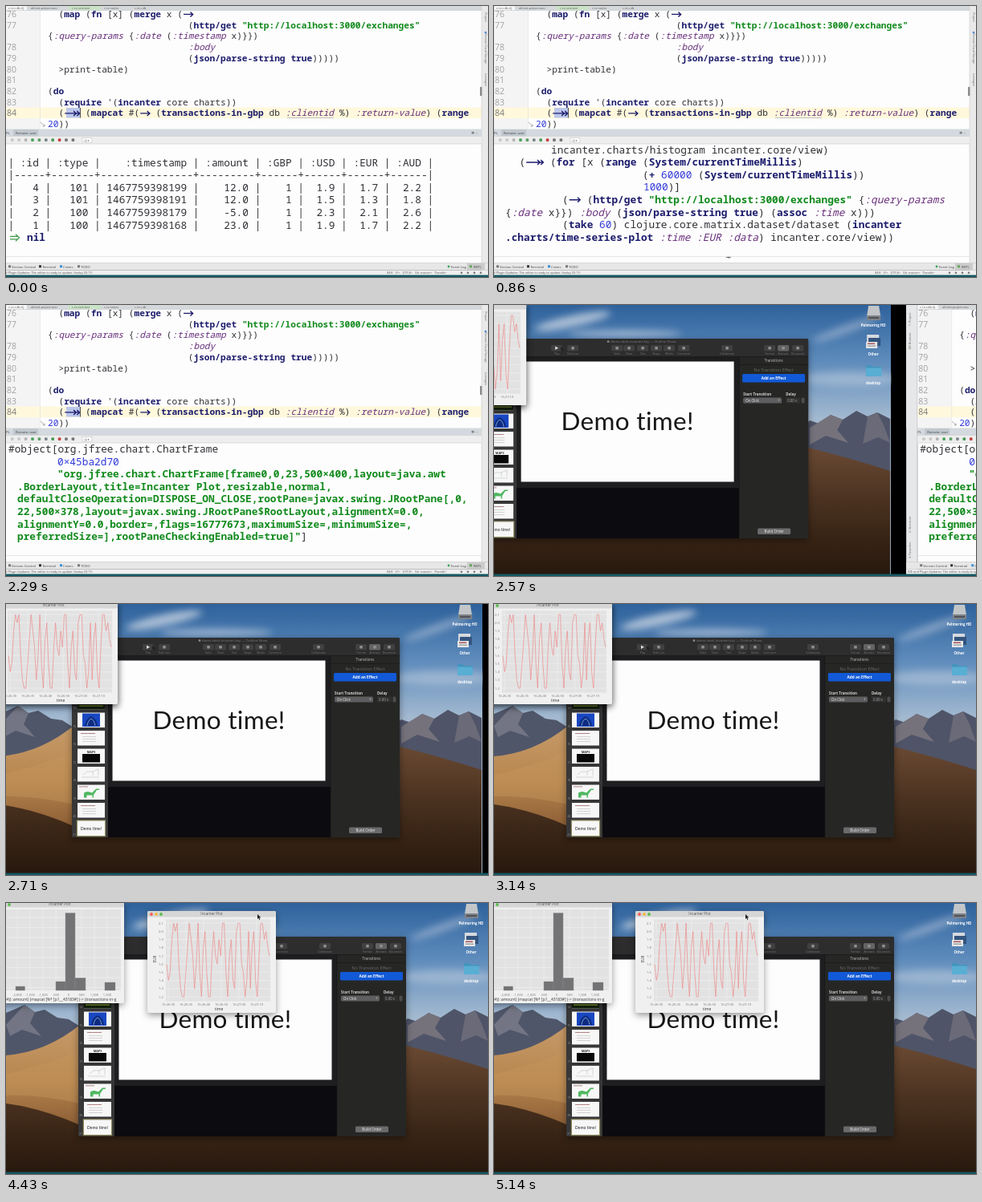
An HTML page that plays this animation: 600 px wide and 338 px high, repeating every 5.28 s.

```html
<!DOCTYPE html>
<html lang="en">
<head>
<meta charset="utf-8">
<title>Live coding demo</title>
<style>
  html, body { margin: 0; width: 100%; height: 100%; overflow: hidden; background: #000; }
  svg { display: block; width: 600px; height: 338px; }
  text { white-space: pre; font-family: "Open Sans", "Noto Sans", sans-serif; }
  .mono { font-family: "Noto Sans Mono", "DejaVu Sans Mono", monospace; fill: #303036; }
  .fn { font-weight: 700; fill: #1c1c6c; }
  .str { font-weight: 700; fill: #118a1c; }
  .key { font-style: italic; fill: #69307c; }
  .num { fill: #3038d8; }
  .mid { text-anchor: middle; }
  .bold { font-weight: 700; }
  .slide { font-family: Lato, "Open Sans", sans-serif; font-variant-ligatures: none; letter-spacing: .01em; }
  .win { filter: drop-shadow(0 3px 4px rgba(0, 0, 0, .4)); }
</style>
</head>
<body>
<svg id="stage" viewBox="0 0 600 338"></svg>
<script>
const LOOP = 5280, STEP = LOOP / 37;
const SPACE = 634;                       // distance between the two desktops

const esc = s => s.replace(/&/g, '&amp;').replace(/</g, '&lt;').replace(/>/g, '&gt;');
const rect = (x, y, w, h, fill, more = '') =>
  `<rect x="${x}" y="${y}" width="${w}" height="${h}" fill="${fill}" ${more}/>`;
const dot = (x, y, r, fill) => `<circle cx="${x}" cy="${y}" r="${r}" fill="${fill}"/>`;
const path = (d, fill, more = '') => `<path d="${d}" fill="${fill}" ${more}/>`;
const line = (d, color, width = 1) => path(d, 'none', `stroke="${color}" stroke-width="${width}"`);
const label = (x, y, s, size, fill, cls = '') =>
  `<text x="${x}" y="${y}" font-size="${size}" fill="${fill}" class="${cls}">${esc(s)}</text>`;
const mid = (x, y, s, size, fill, cls = '') => label(x, y, s, size, fill, 'mid ' + cls);
const turned = (x, y, s, size, fill, deg = -90) =>
  `<g transform="translate(${x} ${y}) rotate(${deg})">${mid(0, 0, s, size, fill)}</g>`;
const mono = (x, y, s, size, cls = '') =>
  `<text x="${x}" y="${y}" font-size="${size}" class="mono ${cls}">${esc(s)}</text>`;
const gradient = (id, ...stops) =>
  `<linearGradient id="${id}" x1="0" y1="0" x2="0" y2="1">` +
  stops.map(([at, c]) => `<stop offset="${at}" stop-color="${c}"/>`).join('') + '</linearGradient>';

// ---- code ----
const TOKEN = /"[^"]*"|->>?|:[a-zA-Z-]+|\.?\w[\w.\/-]*|\S/g;

function arrow(x, y, w, heads) {
  const end = x + w - 1;
  let d = `M${x + 1} ${y}H${end}`;
  for (let i = 0; i < heads; i++) d += `M${end - 3 - i * 4.2} ${y - 3}l3.2 3l-3.2 3`;
  return line(d, '#1c1c6c', 1.4);
}

function code(x, y, s, size) {
  const cw = size * .6;
  let out = '';
  for (const m of s.matchAll(TOKEN)) {
    const w = m[0], tx = x + m.index * cw;
    if (/^->/.test(w)) { out += arrow(tx, y - size * .32, w.length * cw, w.length - 1); continue; }
    const cls = w[0] === '"' ? 'str'
      : /^:[a-z]/i.test(w) ? 'key'
      : /^\d+$/.test(w) ? 'num'
      : s[m.index - 1] === '(' && w !== '(' || /^(fn|true|\.charts.*)$/.test(w) ? 'fn' : '';
    out += mono(+tx.toFixed(2), y, w, size, cls);
  }
  return out;
}

// ---- code editor ----
const ED = 11.2, RP = 12.8;
const edY = row => 14 + row * 13.72;
const rpY = row => 184 + row * 15.6;

function editor() {
  const pad = ' '.repeat(26);
  const rows = [
    [76, '  (map (fn [x] (merge x (->'],
    [77, pad + '(http/get "http://localhost:3000/exchanges"'],
    ['', '{:query-params {:date (:timestamp x)}})'],
    [78, pad + ':body'],
    [79, pad + '(json/parse-string true)))))'],
    [80, '  >print-table)'],
    [81, ''],
    [82, '(do'],
    [83, "  (require '(incanter core charts))"],
    [84, '  (->> (mapcat #(-> (transactions-in-gbp db :clientid %) :return-value) (range'],
    ['', '20))']
  ];
  let s = rect(-14, 0, 614, 154, '#fdfdfd') + rect(0, 5, 42, 149, '#f4f4f4') +
    rect(0, 126.5, 592, 13.7, '#fff8dc') + rect(75, 127, 17, 12.5, '#bcc7ea') +
    line('M42.5 5V154', '#e2e2e2', .7);
  rows.forEach(([n, text], i) => {
    s += label(1, edY(i), String(n), 10.5, i === 9 ? '#777' : '#a2a2a2') + code(52, edY(i), text, ED);
  });
  return s + line('M350 139.5H408', '#999', .6) + line('M92.5 127V139.5', '#222', .8) +
    line('M43 145l5 5m0-2.5v2.5h-2.5', '#999', .8);
}

function ideFrame() {
  let s = rect(-14, 0, 614, 6, '#d5d8da') + rect(0, 0, 26, 5, '#f5f5f5') + rect(78, 0, 40, 5, '#c9e3c6');
  ['c.i.e.c.db.clj', 'atl-test-project.exec', 'c.i.e.core.test', 'c.i.e.routes', 'c.i.e.c.db'].forEach((t, i) => {
    s += label([3, 31, 82, 122, 160][i], 4, t, 3.6, '#555');
  });
  // side bars
  s += rect(592, 0, 8, 336, '#e9e9e9') + line('M592 0V320', '#cfcfcf', .6) + rect(590, 101, 2.5, 11, '#8d8d8d') +
    turned(595.5, 14, 'Project', 3.6, '#666', 90) + turned(595.5, 53, 'Remote Cloud Storage', 3.6, '#666', 90) +
    turned(595.5, 92, 'Leiningen', 3.6, '#666', 90) + dot(597, 33, 1.3, '#4a86cf') +
    rect(-14, 0, 14, 336, '#e6e7e8') + line('M-.5 0V320', '#c9c9c9', .8) +
    turned(-8, 18, '1: Project', 3.8, '#666') + turned(-8, 45, 'DB Browser', 3.8, '#666') +
    turned(-8, 274, '2: Structure', 3.8, '#666') + turned(-8, 306, '2: Favorites', 3.8, '#666');
  // console header and tools
  s += rect(0, 153.5, 592, 9, '#d3d9de') + rect(9, 154, 31, 8, '#c0c8ce') +
    label(0, 159.5, 'PL', 4.2, '#444') + label(12, 159.5, 'Remote: user', 4.2, '#444') +
    label(579, 160, '✱ –', 5, '#777') + rect(0, 162.5, 592, 9.5, '#eeeeee') +
    line('M0 162.5H592M0 172H592', '#cccccc', .6);
  const tints = ['#c9c9c9', '#c9c9c9', '#b5b5b5', '#4ea45b', '#5e9f68', '#7d8791', '#4a9b56', '#c74343', '#777', '#777'];
  tints.forEach((c, i) => { s += rect(6 + i * 8.4, 165.3, 3.6, 3.6, c, 'rx="1"'); });
  s += rect(95, 164.5, 12, 5.5, '#fff', 'stroke="#bbb" stroke-width=".5"') + label(97, 168.8, 'clj ▾', 3.6, '#555');
  // bottom bars
  s += line('M0 312.5H592', '#dedede', .7) + rect(-14, 320.5, 614, 9, '#e7e7e7') +
    rect(-14, 329.5, 614, 7, '#efefef') + line('M-14 320.5H600M-14 329.5H600', '#c7c7c7', .6);
  [[7, 'Version Control', '#777'], [45, 'Terminal', '#333'], [71, 'Crates', '#3c8fd1'], [93, 'TODO', '#777']].forEach(([x, t, c]) => {
    s += rect(x - 4, 323.3, 3, 3, c) + label(x, 326.8, t, 4.2, '#444');
  });
  s += rect(574, 321, 22, 8, '#cbcbcb') + dot(551, 325, 1.4, '#3aa757') + label(554, 326.8, 'Event Log', 4.2, '#444') +
    label(582, 326.8, 'REPL', 4.2, '#444') + rect(577, 323.3, 3, 3, '#65a35e') +
    label(-12, 334, 'IDE and Plugin Updates: The editor is ready to update. (today 20:11)', 3.8, '#555') +
    label(474, 334, '84:8   LF÷   UTF-8÷   Git: master÷   Paredit÷', 3.8, '#555');
  [567, 575, 583, 591].forEach(x => { s += dot(x, 332.7, 1.3, '#777'); });
  return s;
}

function tableView() {
  const heads = [':id', ':type', ':timestamp', ':amount', ':GBP', ':USD', ':EUR', ':AUD'];
  const widths = [3, 5, 13, 7, 4, 4, 4, 4];
  const data = [
    ['4', '101', '1467759398199', '12.0', '1', '1.9', '1.7', '2.2'],
    ['3', '101', '1467759398191', '12.0', '1', '1.5', '1.3', '1.8'],
    ['2', '100', '1467759398179', '-5.0', '1', '2.3', '2.1', '2.6'],
    ['1', '100', '1467759398168', '23.0', '1', '1.9', '1.7', '2.2']
  ];
  const row = r => '| ' + r.map((c, i) => c.padStart(widths[i])).join(' | ') + ' |';
  const rule = '|' + widths.map(w => '-'.repeat(w + 2)).join('+') + '|';
  return [row(heads), rule, ...data.map(row)].map((t, i) => mono(2.5, rpY(i + 1), t, RP)).join('') +
    line('M5 287.4h10M5 290.8h10M12 284.8l4.5 4.3l-4.5 4.3', '#3f9a48', 1.2) +
    mono(26, rpY(7), 'nil', RP, 'fn');
}

function formView() {
  return [
    [71, 'incanter.charts/histogram incanter.core/view)'],
    [31.5, '(->> (for [x (range (System/currentTimeMillis)'],
    [185, '(+ 60000 (System/currentTimeMillis))'],
    [186, '1000)]'],
    [85, '(-> (http/get "http://localhost:3000/exchanges" {:query-params'],
    [14, '{:date x}}) :body (json/parse-string true) (assoc :time x)))'],
    [85, '(take 60) clojure.core.matrix.dataset/dataset (incanter'],
    [14, '.charts/time-series-plot :time :EUR :data) incanter.core/view))']
  ].map(([x, t], i) => code(x, rpY(i) - .5, t, RP)).join('') + line('M289 313.5h6M292 312v3', '#555', .8);
}

function objectView() {
  const body = [
    '"org.jfree.chart.ChartFrame[frame0,0,23,500×400,layout=java.awt',
    '.BorderLayout,title=Incanter Plot,resizable,normal,',
    'defaultCloseOperation=DISPOSE_ON_CLOSE,rootPane=javax.swing.JRootPane[,0,',
    '22,500×378,layout=javax.swing.JRootPane$RootLayout,alignmentX=0.0,',
    'alignmentY=0.0,border=,flags=16777673,maximumSize=,minimumSize=,',
    'preferredSize=],rootPaneCheckingEnabled=true]"'
  ];
  return mono(3, rpY(0), '#object[org.jfree.chart.ChartFrame', RP) + mono(64, rpY(1), '0×45ba2d70', RP, 'num') +
    body.map((t, i) => mono(i ? 14 : 64, rpY(i + 2), t, RP, 'str')).join('') +
    mono(14 + body[5].length * RP * .6, rpY(7), ']', RP);
}

// ---- desktop ----
function wallpaper() {
  return rect(-1, 0, 602, 338, 'url(#sky)') +
    `<g filter="url(#soft)" fill="#d3dbe6">
      <ellipse cx="205" cy="20" rx="48" ry="7" opacity=".75" transform="rotate(-12 205 20)"/>
      <ellipse cx="270" cy="36" rx="70" ry="5" opacity=".6"/>
      <ellipse cx="545" cy="30" rx="45" ry="5" opacity=".45" transform="rotate(-20 545 30)"/>
      <ellipse cx="550" cy="92" rx="60" ry="9" opacity=".4"/></g>` +
    path('M0 137L12 132L23 127L36 136L48 133L64 143L78 145L92 154V215H0Z', '#50566a') +
    path('M23 127L36 136L30 150L44 166L20 158L5 166L0 152Z', '#737584') +
    path('M490 152L500 144L512 148L526 137L541 143L558 132L572 139L584 134L600 142V215H490Z', '#4f5468') +
    path('M526 137L541 143L534 156L548 172L520 163L500 174V153Z', '#75727c') +
    path('M572 139L584 134L592 150L600 172L585 165L566 173Z', '#6a6a78') +
    path('M0 190Q50 186 92 152V290H0Z', 'url(#sand)') +
    path('M0 213Q38 206 92 184V250Q40 238 0 240Z', '#c4945c', 'opacity=".45"') +
    path('M0 250Q45 256 92 277L490 176Q548 190 600 207V338H0Z', 'url(#shade)');
}

function icons() {
  let s = path('M573 1h13l2 13h-17z', '#c3c6c9') + rect(571, 13, 17, 6, '#7d8288', 'rx="1"') +
    rect(573, 15, 13, 2, '#50545a');
  s += rect(571, 37, 15, 9, '#d5d9de') + rect(573, 41, 15, 10, '#34557f') + rect(570, 46, 14, 8, '#e6e6e6') +
    rect(572, 47.5, 9, 1.5, '#a8585c') + rect(572, 50.5, 10, 1.2, '#8f979f');
  s += path('M570 75h7l2 2h10v11.5h-19z', '#4594be') + rect(570, 78.5, 19, 10.5, '#58aed3', 'rx="1"');
  [['Pelmoring HD', 26.5], ['Other', 62.5], ['desktop', 98.5]].forEach(([t, y]) => { s += mid(579, y, t, 4.5, '#fff', 'bold'); });
  return s;
}

function thumbs() {
  const ys = [113, 135.5, 158, 180.5, 203, 225.5, 248, 270.5];
  const lines = y => rect(101, y, 18, .8, '#a0666a') + [4, 7, 10].map(d => rect(103, y + d, 17, .6, '#bbb')).join('');
  const art = [
    rect(97, 113, 34, 18.5, '#14220f') + rect(99, 126, 30, 2, '#6a7d2e'),
    rect(103, 136.5, 22, 16.5, '#1947c2') + path('M106 152q1-9 8-12q7 3 8 12z', '#0d2c80') + line('M109 152q1-7 5-9q4 2 5 9', '#8fb6ee', .8),
    lines(161),
    mid(114, 185.5, 'MAPS', 3.8, '#333', 'bold') + rect(103, 187, 22, 10.5, '#080808'),
    line('M102 216h22M104 213l5-4h7v5M116 209l7-3v8', '#a9b4ae', .5),
    rect(99, 227.5, 11, .8, '#a0666a') + path('M105 241.5v-6q4-3 10 0l5-5h4v1.5h-3l-4 6v3.5h-1.5v-3h-7v3z', '#4fb860'),
    lines(251),
    mid(114, 281.5, 'Demo time!', 5, '#222', 'slide')
  ];
  return rect(95.8, 269.3, 36.4, 20.9, '#8d8a5e', 'rx="1"') + ys.map((y, i) =>
    rect(97, y, 34, 18.5, '#f7f7f7') + art[i] + label(91.5, y + 18, String(14 + i), 3, '#aaa')).join('');
}

function deck() {
  let s = rect(90, 42, 408, 249, '#1e1e20', 'rx="2"') + rect(90, 42, 408, 22.5, '#2d2d2e', 'rx="2"') +
    rect(90, 64, 45, 227, '#373738') + rect(135, 228, 277, 63, '#0c0b10') +
    rect(412, 64.5, 86, 226.5, '#262725') + line('M90 64.5H498M412 64V291M412 74.5H498', '#171717', .7);
  s += dot(249, 45.7, 1.4, '#8a8a8a') + label(252, 47.3, 'demo-deck-incanter.key — Outline Show', 4.3, '#7d7d7d');
  const tools = [[185, 'Play'], [205, 'Slide Live'], [260, 'Table'], [275, 'Chart'], [292, 'Text'], [309, 'Shape'],
    [325, 'Media'], [343, 'Comment'], [397, 'Collaborate'], [450, 'Format'], [467, 'Animate'], [485, 'Document']];
  tools.forEach(([x, t]) => {
    s += rect(x - 7, 50, 14, 7.5, t === 'Animate' ? '#636363' : '#404041', 'rx="1.5"') +
      (t === 'Play' ? path('M183 51.5l4 2.3l-4 2.3z', '#ddd') : rect(x - 1.8, 52, 3.6, 3.5, '#8f8f8f', 'rx=".7"')) +
      mid(x, 62.2, t, 3.4, '#777');
  });
  s += rect(140.5, 70.5, 265, 150, '#fcfdfc') + mid(273, 155.5, 'Demo time!', 31.5, '#161616', 'slide');
  s += mid(455, 71, 'Transitions', 4.5, '#c8c8c8') + mid(455, 83, 'No Transition Effect', 5.4, '#6c6c6c') +
    rect(416, 86, 78, 10.5, '#1159d6', 'rx="1.5"') + mid(455, 93, 'Add an Effect', 4.7, '#fff', 'bold') +
    label(417, 112.5, 'Start Transition', 4.5, '#d5d5d5', 'bold') + label(470, 112.5, 'Delay', 4.5, '#d5d5d5', 'bold') +
    rect(417, 115.5, 48, 7, '#5e5e60', 'rx="1.5"') + label(420, 120.7, 'On Click', 4.4, '#eee') +
    label(460, 120.7, '÷', 5, '#eee') + rect(470, 115.5, 18, 7, '#303030') + label(472, 120.7, '0.00 s', 4.4, '#aaa') +
    rect(489.5, 115.5, 4, 7, '#4c4c4c', 'rx="1.5"') +
    rect(435, 278.5, 41, 7.5, '#6a6a6c', 'rx="1.5"') + mid(455.5, 284, 'Build Order', 4.5, '#f0f0f0');
  return s + thumbs();
}

// ---- chart windows, 160 x 127, own coordinates ----
const frame = rect(0, 0, 160, 127, '#f0f0f0', 'rx="2"') + rect(0, 0, 160, 7.5, '#d6d6d6', 'rx="2"') +
  ['#f0605a', '#f1b93f', '#58bf4c'].map((c, i) => dot(5 + i * 6, 4, 1.9, c)).join('') +
  mid(80, 5.3, 'Incanter Plot', 4.6, '#555');

function seriesPlot() {
  const values = [4, 2, 3, 7, 9, 8, 9, 4, 1, 0, 0, 3, 6, 9, 7, 5, 1, 4, 9, 3, 0, 6, 8, 3, 0, 0, 5, 8, 5, 4,
    7, 5, 9, 9, 3, 0, 5, 7, 2, 1, 8, 9, 9, 4, 3, 0, 2, 8, 1, 6, 8, 2, 0, 5, 9, 9, 7, 8, 6, 5];
  let s = frame + rect(23, 10.5, 130, 102, '#e2e2e2');
  for (let i = 0; i < 10; i++) {
    const y = 107 - i * 10.2;
    s += line(`M23 ${y}H153`, '#f2f2f2', .6) + label(14, y + 1.5, (1.2 + i / 10).toFixed(1), 4.1, '#777');
  }
  ['16:26:30', '16:26:35', '16:26:40', '16:26:50', '16:27:00', '16:27:10'].forEach((t, i) => {
    s += line(`M${26 + i * 22} 10.5V112.5`, '#f2f2f2', .6) + mid(26 + i * 22, 117.5, t, 4.1, '#777');
  });
  const pts = values.map((v, i) => `${(24 + i * 2.17).toFixed(1)} ${(107 - v * 10.2).toFixed(1)}`);
  return s + line('M' + pts.join('L'), '#ee8585', .65) + turned(10.5, 60, 'EUR', 4.8, '#444') + mid(89, 124, 'time', 5, '#333');
}

function histogram() {
  let s = frame + rect(12, 10, 144, 101, '#e2e2e2');
  for (let i = 0; i < 8; i++) {
    const x = 27 + i * 16, v = (i - 4) * 500;
    s += line(`M${x} 10V111`, '#f2f2f2', .6) + line(`M12 ${20 + i * 12.5}H156`, '#f2f2f2', .6) +
      mid(x, 117.5, v.toLocaleString('en-US'), 4.1, '#777');
  }
  [[25, 11.5, 5], [75, 12, 11], [87, 12, 96.5], [99, 13, 15.5], [136, 13, 10]].forEach(([x, w, h]) => {
    s += rect(x, 111 - h, w, h, '#737375', 'stroke="#8a8a8c" stroke-width=".4"');
  });
  return s + label(11, 124, '44)) :amount) (mapcat [%* [p1__43183#] (-> (transactions-in-g', 4.9, '#333');
}

const stage = document.getElementById('stage');
stage.innerHTML = `<defs>
  ${gradient('sky', [0, '#2f629c'], [.2, '#5c8abb'], [.42, '#a3b9d0'], [1, '#a3b9d0'])}
  ${gradient('sand', [0, '#c59a68'], [.5, '#b8864f'], [1, '#835630'])}
  ${gradient('shade', [0, '#6a4a33'], [.4, '#4c3321'], [.7, '#382415'], [1, '#26180e'])}
  <filter id="soft" x="-30%" y="-100%" width="160%" height="300%"><feGaussianBlur stdDeviation="5"/></filter>
  <clipPath id="screen"><rect x="0" y="0" width="601" height="338"/></clipPath>
  <clipPath id="pane"><rect width="160" height="127"/></clipPath></defs>
  ${rect(0, 0, 600, 338, '#000')}
  <g id="spaces">
    <g transform="translate(${-SPACE} 0)" clip-path="url(#screen)">
      ${wallpaper()}${icons()}<g class="win">${deck()}</g>
      <g class="win" transform="translate(-13 -2)"><g clip-path="url(#pane)">${histogram()}</g></g>
      <g class="win" id="plot">${seriesPlot()}</g>
      <g id="pointer">${path('M0 0v6l1.4-1.3l1 2.2l1-.4l-1-2.2h2z', '#222')}</g>
    </g>
    ${editor()}${rect(0, 154, 592, 167, '#fdfdfd')}
    <g class="view">${tableView()}</g><g class="view">${formView()}</g><g class="view">${objectView()}</g>
    ${ideFrame()}
  </g>
  ${rect(0, 335.5, 600, 2.5, '#145762')}`;

// ---- motion ----
const [spaces, plot, pointer] = ['spaces', 'plot', 'pointer'].map(id => document.getElementById(id));
const views = [...document.querySelectorAll('.view')];
const part = (t, from, to) => Math.min(1, Math.max(0, (t - from) / (to - from)));
const easeOut = p => 1 - (1 - p) ** 3;
const easeBoth = p => p * p * (3 - 2 * p);
const move = (el, x, y) => el.setAttribute('transform', `translate(${x.toFixed(2)} ${y.toFixed(2)})`);

function draw(ms) {
  const t = Math.floor((ms % LOOP + 3) / STEP) % 37 * STEP;
  const shown = t < 500 ? 0 : t < 1280 ? 1 : 2;
  views.forEach((v, i) => { v.style.display = i === shown ? '' : 'none'; });
  move(spaces, SPACE * easeOut(part(t, 2369, 2815)), 0);
  const reach = easeBoth(part(t, 3150, 3560)), drag = easeBoth(part(t, 3570, 4280));
  move(plot, -13 + 189 * drag, -2 + 12 * drag);
  move(pointer, 190 - 66 * reach + 189 * drag, 51.5 - 49.5 * reach + 12 * drag);
}

const start = performance.now();
(function tick() {
  draw(performance.now() - start);
  requestAnimationFrame(tick);
})();
</script>
</body>
</html>
```
